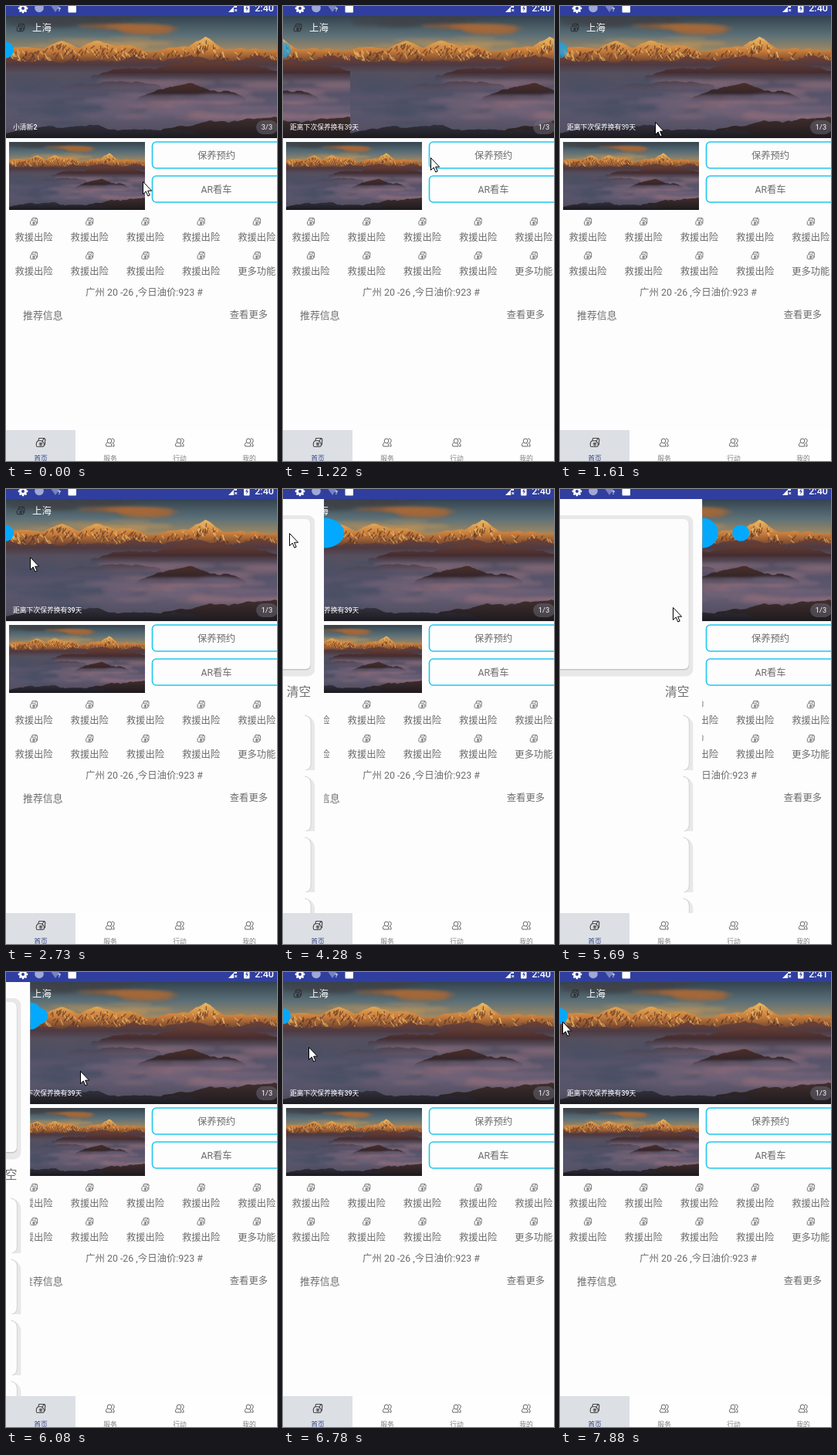
An HTML page with a canvas that plays this animation: 351x589 px, repeating every 8000 ms.

```html
<!DOCTYPE html>
<html lang="zh">
<head>
<meta charset="utf-8">
<style>
html, body { margin: 0; height: 100%; overflow: hidden; background: #fdfdfd; }
canvas { display: block; }
</style>
</head>
<body>
<canvas id="stage" width="351" height="589"></canvas>
<script>
const LOOP = 8000, W = 351, H = 589, PHOTO_H = 158;
const FONT = 'Roboto, "Noto Sans CJK SC", "Noto Sans CJK", sans-serif';
const PAPER = '#fdfdfd', GREY = '#6c6c6c', CYAN = '#1fc8f2', BLUE = '#03a9ff';
let c = document.getElementById('stage').getContext('2d');

const mix = (a, b, p) => a + (b - a) * p;
const ramp = (t, from, to) => Math.max(0, Math.min(1, (t - from) / (to - from)));
const ease = (t, from, to) => (1 - Math.cos(Math.PI * ramp(t, from, to))) / 2;
const rand = (i, seed) => {
  const v = Math.sin(i * 127.1 + seed * 311.7) * 43758.5;
  return v - Math.floor(v);
};

// ---- drawing helpers ----
function text(s, x, y, size, color = GREY, align = 'center', weight = 400) {
  c.font = `${weight} ${size}px ${FONT}`;
  c.textAlign = align;
  c.fillStyle = color;
  c.fillText(s, x, y + size * .37);
}

function rect(x, y, w, h, color) { c.fillStyle = color; c.fillRect(x, y, w, h); }

function round(x, y, w, h, r, fill, line, width = 1) {
  c.beginPath();
  c.roundRect(x, y, w, h, r);
  c.fillStyle = fill;
  c.fill();
  if (line) { c.strokeStyle = line; c.lineWidth = width; c.stroke(); }
}

function oval(x, y, rx, ry, color, from = 0, to = Math.PI * 2) {
  c.beginPath();
  c.ellipse(x, y, rx, ry, 0, from, to);
  c.fillStyle = color;
  c.fill();
}

function shape(d, x, y, fill, line, width = 1, scale = 1) {
  const p = new Path2D(d);
  c.save();
  c.translate(x, y);
  c.scale(scale, scale);
  if (fill) { c.fillStyle = fill; c.fill(p); }
  if (line) { c.strokeStyle = line; c.lineWidth = width; c.stroke(p); }
  c.restore();
}

function fade(y0, y1, ...colors) {
  const g = c.createLinearGradient(0, y0, 0, y1);
  colors.forEach((k, i) => g.addColorStop(i / (colors.length - 1), k));
  return g;
}

// ---- landscape, painted once ----
function rough(x, seed) {
  let sum = 0;
  for (let step = 24; step > 2; step /= 2) {
    const i = Math.floor(x / step);
    sum += step / 24 * (mix(rand(i, seed), rand(i + 1, seed), x / step - i) - .5);
  }
  return sum;
}

function ridge(from, to, top, fill) {
  c.beginPath();
  c.moveTo(from, PHOTO_H);
  for (let x = from; x <= to; x++) c.lineTo(x, top(x));
  c.lineTo(to, PHOTO_H);
  c.fillStyle = fill;
  c.fill();
}

// A hill rising out of the mist
function hill(from, to, foot, height, seed, fill) {
  const top = x => foot - height * Math.sin(Math.PI * (x - from) / (to - from)) + 7 * rough(x, seed);
  ridge(from, to, top, fill);
}

// Soft flat streaks scattered between two heights
function wisps(n, y0, y1, color, seed, x0 = 0, x1 = W) {
  c.filter = 'blur(2px)';
  for (let i = 0; i < n; i++) {
    const x = mix(x0, x1, rand(i, seed)), y = mix(y0, y1, rand(i, seed + 1));
    oval(x, y, 18 + 40 * rand(i, seed + 2), 1.5 + 3 * rand(i, seed + 3), color);
  }
  c.filter = 'none';
}

function paintPhoto() {
  const img = document.createElement('canvas'), page = c;
  img.width = W;
  img.height = PHOTO_H;
  c = img.getContext('2d');
  rect(0, 0, W, PHOTO_H, fade(0, 50, '#34434e', '#5c7078', '#b08e5c'));
  wisps(12, 0, 12, '#41434899', 3, 0, 200);
  wisps(9, 13, 22, '#a8693a99', 9, 135, 225);
  wisps(8, 26, 42, '#c69a5a66', 14, 0, 200);

  const peaks = [[72, 10], [118, 6], [160, 2], [258, 14]];
  const snow = x => 43 + 8 * rough(x, 5) -
    peaks.reduce((sum, [px, h]) => sum + h * Math.max(0, 1 - Math.abs(x - px) / 22), 0);
  ridge(0, W, snow, fade(28, 62, '#eab660', '#c87c3a', '#5f3a2e'));
  for (let i = 0; i < 260; i++) {
    const x = W * rand(i, 20), y = snow(x) + 2 + 14 * rand(i, 21), side = rand(i, 22) - .5;
    c.beginPath();
    c.moveTo(x, y);
    c.lineTo(x + 12 * side, y + 3 + 5 * rand(i, 23));
    c.lineWidth = 1.4;
    c.strokeStyle = side > .1 ? '#f3c36c99' : '#5b352baa';
    c.stroke();
  }
  ridge(0, W, x => 56 + 10 * rough(x, 8), fade(52, 74, '#6e4034', '#4e3a42', '#55505f'));

  rect(0, 70, W, 88, fade(70, PHOTO_H, '#54505f00', '#56536a', '#625b70', '#4b485a'));
  hill(110, 400, 78, 17, 11, fade(58, 88, '#6b3d30', '#442d31', '#5a516500'));
  wisps(30, 74, 140, '#484f6577', 30, 0, 150);
  wisps(26, 84, 135, '#85697888', 40, 150, W);
  wisps(14, 108, 135, '#a0778066', 50, 200, W);
  hill(70, 200, 92, 7, 12, fade(82, 98, '#4a3a42', '#55506400'));
  hill(160, 310, 108, 18, 13, fade(88, 112, '#4a2d28', '#33262a', '#5b506200'));
  wisps(14, 104, 130, '#6c627899', 60, 110, 330);
  hill(190, 480, 150, 20, 15, fade(128, PHOTO_H, '#43302f', '#1e1a1e'));
  hill(-80, 290, 158, 14, 16, fade(140, PHOTO_H, '#33323d', '#1c1a20'));
  c = page;
  return img;
}
const photo = paintPhoto();

// ---- small icons ----
function bag(x, y, scale, color) {
  shape('M-3-2Q-6 0-5 4Q-5 5-3 5H2Q4 5 4 3Q4 0 1-2ZM-3-2L-2-5H4L2-2M4-5Q6-4 5-1V3M-2 1H2M-2 3H2M0 0V4',
    x, y, null, color, 1, scale);
}

function people(x, y) {
  shape('M-1-5a2.8 3 0 1 1 0 6a2.8 3 0 1 1 0-6M-4 0q-3 3-1 5h7q0-2-1-4M2-5q4 0 3 4-1 2-2 2 3 1 2 4h-2',
    x, y, null, '#666');
}

// ---- screen parts ----
function statusBar(t) {
  rect(0, 0, W, 13, '#303f9f');
  for (let a = 0; a < 8; a++) {
    const turn = a * Math.PI / 4;
    oval(22 + 5 * Math.cos(turn), 3 + 5 * Math.sin(turn), 1.4, 1.4, '#fff');
  }
  oval(22, 3, 4.8, 4.8, '#fff');
  oval(22, 3, 2, 2, '#303f9f');
  oval(43, 2.5, 5.8, 5.8, '#9fa8d8');
  shape('M-7-4h14l-7 10z', 64, 2, '#7782c2');
  text('?', 69, 4, 8, '#fff', 'center', 700);
  round(80.5, -3, 10.5, 11.5, 1, '#fff');
  shape('M-6 6L5-5v5h-4v6z', 294, 2, '#fff');
  text('×', 297.5, 5, 8, '#fff', 'center', 700);
  round(308, -3, 7.5, 11.5, 1, '#fff');
  shape('M1-4l-3 5h2l-1 4 3-5h-2z', 312, 2.5, '#303f9f');
  text(t < 7300 ? '2:40' : '2:41', 347, 2.7, 12.6, '#fff', 'right', 500);
}

function banner(t) {
  const next = t >= 1100, settled = !next || t > 1900;
  const x = next ? Math.round(W * (1 - ramp(t, 1026, 1826)) ** 0 * (1 - (1 - ramp(t, 1026, 1826)) ** 5)) : 0;
  c.drawImage(photo, -x, 13);
  c.drawImage(photo, W - x, 13);
  bag(19, 28, .95, '#25262b');
  text('上海', 34, 28, 12.4, '#fff', 'left');
  text(next ? '距离下次保养换有39天' : '小清新2', 9, 157, 8.8, '#fff', 'left', settled ? 500 : 400);
  round(324, 148, 28, 18, 9, 'rgba(110,108,122,.5)');
  text(next ? '1/3' : '3/3', 338, 157, 9.3, '#fff');
}

function page() {
  c.drawImage(photo, 4, 175.5, 176, 88);
  ['保养预约', 'AR看车'].forEach((s, i) => {
    const y = 176 + 44 * i;
    round(189.5, y, 166, 34, 5, PAPER, CYAN, 1.6);
    text(s, 272.5, y + 17.4, 12.3);
  });
  for (let i = 0; i < 10; i++) {
    const x = 36 + 72.2 * (i % 5), y = i < 5 ? 279 : 323;
    bag(x, y, .9, '#666');
    text(i < 9 ? '救援出险' : '更多功能', x, y + 20.7, 12.3);
  }
  text('广州 20 -26 ,今日油价:923 #', 179, 370, 12.4);
  text('推荐信息', 22, 400.3, 12.9, GREY, 'left');
  text('查看更多', 339, 399.7, 12.3, GREY, 'right');
}

function drawer(edge, reach) {
  if (edge < .5) return;
  const grow = Math.min(1, edge / 40);
  oval(edge, 57, reach * grow, mix(10, 19.5, grow), BLUE, -Math.PI / 2, Math.PI / 2);
  c.save();
  c.beginPath();
  c.rect(0, 13, edge, 536);
  c.clip();
  c.translate(edge, 0);
  rect(-W, 13, W, 536, PAPER);
  round(-300, 34, 288, 208.5, 9, '#e8e8e8');
  round(-300, 39.5, 283, 195, 6, '#c6c6c6');
  round(-300, 39, 282.5, 194, 6, '#fcfcfc');
  text('清空', -17, 262, 15.7, '#707070', 'right');
  for (let y = 293; y < 549; y += 79) {
    round(-40, y, 28, 71, [0, 14, 0, 0], '#e8e8e8');
    round(-60, y - 1, 43, 72, [0, 11, 9, 0], PAPER);
    shape('M-25 0q8 1 8 10v52q0 7-6 9', 0, y, null, '#d2d2d2');
  }
  c.restore();
}

function nav() {
  rect(0, 549, W, 40, '#fefefe');
  rect(0, 549, 90, 40, '#dce0e5');
  ['首页', '服务', '行动', '我的'].forEach((s, i) => {
    const x = 45 + 90 * i;
    if (i) people(x, 565); else bag(x, 565, 1.1, '#444');
    text(s, x, 585.3, 8.8, i ? '#808080' : '#303f80');
  });
}

function pointer(t) {
  let x = 177, y = 227;
  const move = (from, to, nx, ny) => {
    const p = ramp(t, from, to);
    x = mix(x, nx, p);
    y = mix(y, ny, p);
  };
  move(810, 820, 191, 196);
  move(1300, 2030, 31, 88);
  move(2730, 3700, 8, 57);
  move(4400, 5150, 146, 153);
  move(5750, 6500, 33, 97);
  move(6780, 7600, 3, 64);
  shape('M.5.5v16l3.7-3.5 2.6 6 2.4-1-2.6-5.8h5z', Math.round(x), Math.round(y), '#fff', '#000');
}

function draw(t) {
  rect(0, 0, W, H, PAPER);
  banner(t);
  page();
  const edge = 276 * (ease(t, 3960, 5070) - ease(t, 5300, 6300));
  const dot = 276 * (ease(t, 4140, 5070) - ease(t, 5490, 6290));
  c.globalAlpha = 1 - .35 * (ramp(t, 110, 360) - ramp(t, 2140, 2300) + ramp(t, 7870, 8120));
  oval(dot - 1, 57, 11, 10.5, BLUE);
  c.globalAlpha = 1;
  drawer(edge, t < 5200 ? 26 : 20.5);
  nav();
  statusBar(t);
  pointer(t);
}

function tick() {
  draw(performance.now() % LOOP);
  requestAnimationFrame(tick);
}
tick();
</script>
</body>
</html>
```
